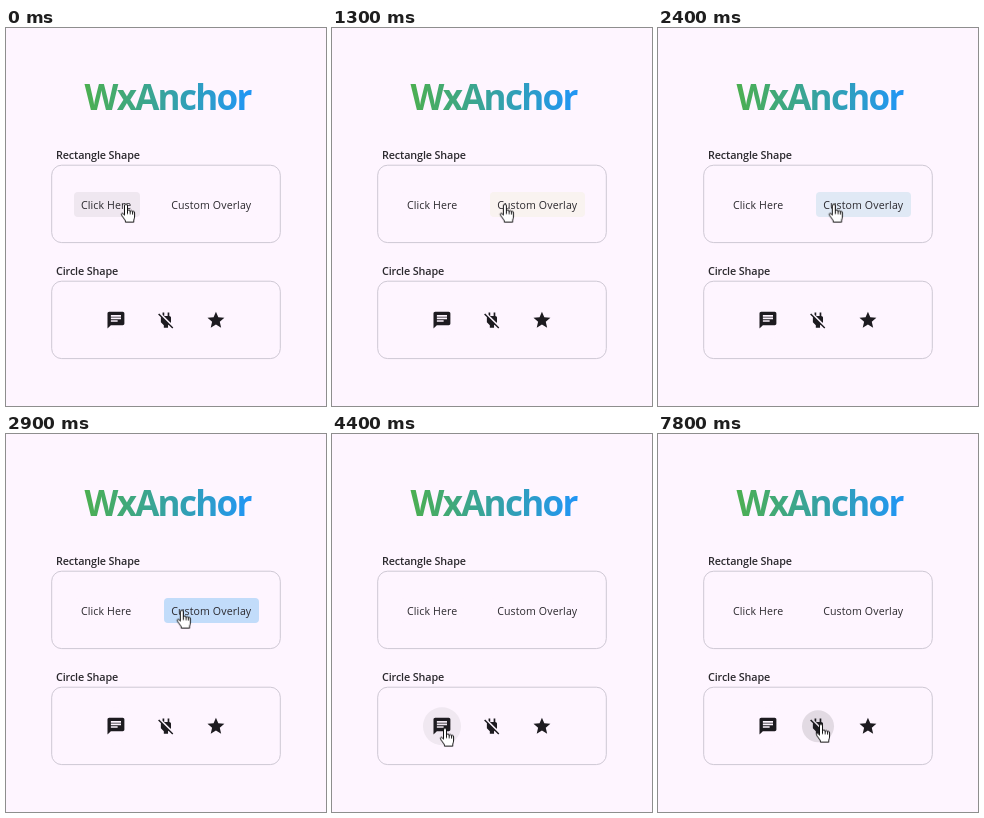
Recreate the animation shown at these times as an HTML page. Size 320 by 378 pixels, loop 8 s.

```html
<!DOCTYPE html>
<html lang="en">
<head>
<meta charset="utf-8">
<title>WxAnchor</title>
<style>
  html, body { margin: 0; width: 100%; height: 100%; overflow: hidden; background: #fef5ff; }
  svg { display: block; width: 100%; height: 100%; }
  text { font-family: "Open Sans", "Noto Sans", sans-serif; fill: #1d1b20; }
  .title { font-size: 35px; font-weight: 700; letter-spacing: -1.7px; fill: url(#brand); }
  .label { font-size: 10.8px; font-weight: 600; letter-spacing: -.13px; fill: #2b292e; }
  .action { font-size: 10.6px; letter-spacing: .1px; fill: #2b292e; }
  .card { fill: none; stroke: #cec8d4; }
  .icon { fill: #1d1b20; }
  .cursor path { fill: #fff; stroke: #111; stroke-linejoin: round; }
  .cursor .knuckles { fill: none; stroke-linecap: round; }

  .click, .custom, .chat, .power, .cursor { animation: 8s linear infinite; }
  .click { animation-name: click; }
  .custom { animation-name: custom; }
  .chat { animation-name: chat; }
  .power { animation-name: power; }
  .cursor { animation-name: move; }

  @keyframes click {
    0%, 11.25% { fill: #efe7f0; }
    14%, 100% { fill: #fef5ff; }
  }
  @keyframes custom {
    0%, 13.75% { fill: #fef5ff; }
    16.25%, 20.6% { fill: #f9f3f0; }
    23.5%, 28.5% { fill: #c2dcfa; }
    31.25%, 34.7% { fill: #f9f3f0; }
    36.25%, 41% { fill: #c2dcfa; }
    44%, 100% { fill: #fef5ff; }
  }
  @keyframes chat {
    0%, 51.25% { fill: #fef5ff; }
    53.75%, 58.5% { fill: #f0e8f1; }
    60%, 66% { fill: #e6dee7; }
    68.75%, 72.3% { fill: #f0e8f1; }
    75%, 80.5% { fill: #e6dee7; }
    86%, 100% { fill: #fef5ff; }
  }
  @keyframes power {
    0%, 85.5% { fill: #fef5ff; }
    88.5%, 95.8% { fill: #f0e8f1; }
    97.4%, 100% { fill: #e2dae3; }
  }
  @keyframes move {
    0%, 9.5% { transform: translate(120px, 175.6px); animation-timing-function: ease-in-out; }
    16.25% { transform: translate(172.8px, 175.6px); }
    18.75%, 41% { transform: translate(175.8px, 175.6px); animation-timing-function: ease-in; }
    46.25% { transform: translate(150px, 221px); }
    51.25% { transform: translate(116px, 275px); animation-timing-function: ease-out; }
    55%, 80.5% { transform: translate(113px, 293.6px); animation-timing-function: ease-in-out; }
    90%, 100% { transform: translate(163px, 289.6px); }
  }
</style>
</head>
<body>
<svg viewBox="0 0 320 378">
  <defs>
    <linearGradient id="brand" gradientUnits="userSpaceOnUse" x1="78" x2="242" y1="0" y2="0">
      <stop stop-color="#4caf50"/>
      <stop offset="1" stop-color="#2196f3"/>
    </linearGradient>
  </defs>

  <text class="title" x="78.5" y="82">WxAnchor</text>

  <text class="label" x="50" y="130.8">Rectangle Shape</text>
  <rect class="card" x="45.7" y="137.2" width="228.6" height="77.4" rx="10"/>
  <rect class="click" x="68" y="164" width="66" height="25" rx="4"/>
  <rect class="custom" x="158" y="164" width="95" height="25" rx="4"/>
  <text class="action" x="75" y="181">Click Here</text>
  <text class="action" x="165.2" y="181">Custom Overlay</text>

  <text class="label" x="50" y="246.8">Circle Shape</text>
  <rect class="card" x="45.7" y="253.2" width="228.6" height="77.4" rx="10"/>
  <circle class="chat" cx="110" cy="292.3" r="19"/>
  <circle class="power" cx="160" cy="292.3" r="16"/>
  <g class="icon">
    <path transform="translate(99.8 282) scale(.845)" d="M20 2H4c-1.1 0-2 .9-2 2v18l4-4h14c1.1 0 2-.9 2-2V4c0-1.1-.9-2-2-2zM6 9h12v2H6V9zm8 5H6v-2h8v2zm4-6H6V6h12v2z"/>
    <path transform="translate(149.8 282) scale(.845)" d="M18 14.5V9c0-1-1-2-2-2V3h-2v4h-4V3H8v2.5l9.5 9.5zM16.2 16.3 4 4 2.7 5.25 6.1 8.6 6 9v5.5L9.5 18v3h5v-3l.5-.5 4.5 4.5 1.2-1.3z"/>
    <path transform="translate(199.8 282) scale(.845)" d="M12 17.27 18.18 21l-1.64-7.03L22 9.24l-7.19-.61L12 2 9.19 8.63 2 9.24l5.46 4.73L5.82 21z"/>
  </g>

  <g class="cursor">
    <path d="M-1.5 11.5V2a1.5 1.5 0 0 1 3 0V7.5q0-1.2 1.4-1.1t1.3 1.3q.1-.8 1.2-.7t1.2 1.2q.1-.6 1-.5t1 1.3V13q0 1.6-.8 3.2V18.5H-.6V17L-4.3 11.8q-.9-1.5.2-2.1t2.6 1.8z"/>
    <path class="knuckles" d="M1.5 7.5V10M4.2 7.7V10.2M6.6 8.2V10.5"/>
  </g>
</svg>
</body>
</html>
```
